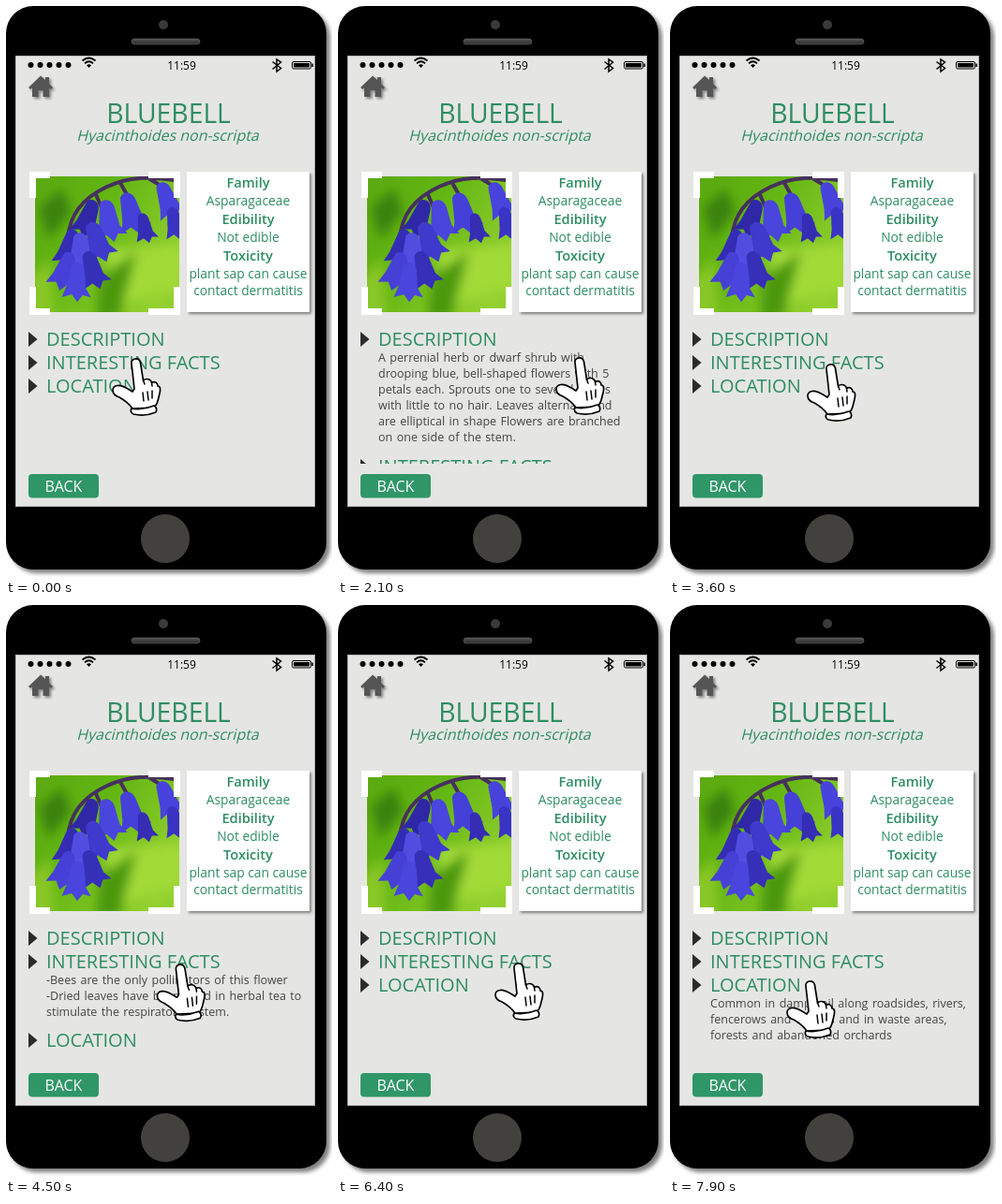
Write an HTML page that moves like this. It is 348 px wide and 610 px high and loops after 8 s.

```html
<!DOCTYPE html>
<html lang="en">
<head>
<meta charset="utf-8">
<title>Bluebell</title>
<style>
  html, body { margin: 0; width: 100%; height: 100%; overflow: hidden; background: #fff; }
  svg { display: block; width: 348px; height: 610px; font-family: "Open Sans", "Noto Sans", sans-serif; }
  .green { fill: #2d8d61; }
  .mid { text-anchor: middle; }
  .head { font-size: 20px; }
  .body { font-size: 12.5px; word-spacing: 1.2px; fill: #444; }
  .label { font-size: 14.6px; font-weight: 600; }
  .value { font-size: 13.8px; }
</style>
</head>
<body>
<svg viewBox="0 0 348 610">
  <defs>
    <linearGradient id="leaf" x2="1" y2=".6">
      <stop offset="0" stop-color="#5aa811"/>
      <stop offset=".45" stop-color="#62b512"/>
      <stop offset="1" stop-color="#93d02f"/>
    </linearGradient>
    <linearGradient id="metal" x2="0" y2="1">
      <stop offset="0" stop-color="#555"/>
      <stop offset="1" stop-color="#2b2b2b"/>
    </linearGradient>
    <filter id="shadow" x="-10%" y="-10%" width="125%" height="125%">
      <feDropShadow dx="2" dy="2" stdDeviation="1.8" flood-opacity=".45"/>
    </filter>
    <filter id="deep" x="-10%" y="-10%" width="125%" height="125%">
      <feDropShadow dx="4" dy="4" stdDeviation="2.2" flood-opacity=".5"/>
    </filter>
    <filter id="soft"><feGaussianBlur stdDeviation="6"/></filter>
    <clipPath id="photo"><rect x="31" y="182" width="154" height="145"/></clipPath>
    <clipPath id="list"><rect x="10" y="338" width="320" height="151"/></clipPath>
    <path id="bell" d="M-4-13C0-18 6-15 7-9L9 5 14 12 7 11 3 17-2 11-10 14-7 5Z"/>
  </defs>

  <!-- phone -->
  <rect width="342" height="602" rx="29" filter="url(#deep)"/>
  <circle cx="168" cy="20" r="5" fill="#3a3a3a"/>
  <rect x="134" y="35" width="73" height="6" rx="3" fill="url(#metal)" stroke="#666" stroke-width=".6"/>
  <circle cx="170" cy="569" r="26" fill="#43413e"/>
  <rect x="10.500" y="53.500" width="319" height="481" fill="#e5e6e3" stroke="#bbb"/>

  <!-- status bar -->
  <path d="M26.500 63H68" stroke="#000" stroke-width="6" stroke-linecap="round" stroke-dasharray="0 10"/>
  <g fill="none" stroke="#000" stroke-width="1.800">
    <path d="M81.500 58.500Q88.500 52.500 95.500 58.500M84 61.300Q88.500 57.300 93 61.300"/>
    <path d="M284.500 59.500L293.500 66.500 289 70V57L293.500 60 284.500 67.500" stroke-width="1.500"/>
    <rect x="305.500" y="59.500" width="20" height="7.500" rx="1.500" stroke-width="1"/>
  </g>
  <path d="M86 63.300Q88.500 61.300 91 63.300L88.500 66ZM307 61H324V65.500H307ZM326.500 61.500H328V65H326.500Z"/>
  <text class="mid" x="187.500" y="67.500" font-size="12" font-weight="500">11:59</text>
  <path d="M24 87L37 74.500 42 79V76H46V83L50 87 48 89 46 87.500V97H39.500V90H34.500V97H28V87.500L26 89Z"
        fill="#555" filter="url(#shadow)"/>

  <!-- title -->
  <g class="green mid">
    <text x="173.500" y="125" font-size="28.300">BLUEBELL</text>
    <text transform="translate(172.500 143.500) skewX(-14)" font-size="16">Hyacinthoides non-scripta</text>
  </g>

  <!-- photo -->
  <g clip-path="url(#photo)">
    <rect x="25" y="176" width="162" height="156" fill="url(#leaf)"/>
    <g filter="url(#soft)">
      <path d="M35 215L60 195 70 220 45 250Z" fill="#3a8210"/>
      <path d="M105 260L190 255V300L115 320Z" fill="#a2da38"/>
      <path d="M25 290L48 270 52 335H25Z" fill="#89c728"/>
      <path d="M100 290L140 262 120 335H95Z" fill="#4c980f"/>
    </g>
    <path d="M66 248C68 222 84 204 108 193S152 182 186 187M95 199L104 220M122 189L131 205M152 184L172 196"
          fill="none" stroke="#46305c" stroke-width="4"/>
    <g id="bells"></g>
  </g>
  <path d="M28.500 205V180.500H47M152 180.500H182.500V205M182.500 300V326.500H152M47 326.500H28.500V300"
        fill="none" stroke="#fff" stroke-width="7"/>

  <!-- fact card -->
  <rect x="193" y="177" width="131" height="150" fill="#fff" filter="url(#shadow)"/>
  <g id="card" class="green mid"></g>

  <g id="sections" clip-path="url(#list)"></g>

  <rect x="24" y="500" width="75" height="25.500" rx="4" fill="#2f9668"/>
  <text class="mid" x="61.500" y="518.500" font-size="16" fill="#fff">BACK</text>

  <g id="hand" fill="#fff" stroke="#000" stroke-width="1.700" stroke-linejoin="round" stroke-linecap="round">
    <path d="M-5 5C-6-1 3-2 4.500 4L7.500 23C11 20 16 22 16.500 25.500 20 23 23 26 23 29 26 29 26 33 25 37L23 45Q22 49 19 52L-4 53Q-9 46-18 41C-27 38-27 29-20 28.500-14 28-9 32-4 35L-2 32Z"/>
    <path d="M-5 53Q7 55 19 50 23 52 21 57 9 62-3 59-7 57-5 53Z"/>
    <path d="M7.500 23L9 27M16.500 25.500L17 29M7 36L8 45M12 35L13 44M17 34L17 42" fill="none" stroke-width="1.500"/>
  </g>
</svg>
<script>
const $ = id => document.getElementById(id);
const LOOP = 8000;
const label = (x, y, cls, text) => `<text x="${x}" y="${y}" class="${cls}">${text}</text>`;

// x, y, size, rotation, colour
$('bells').innerHTML = [
  [86, 226, 1.3, 20, '#3027a6'], [108, 229, 1.4, -8, '#4a45dc'], [132, 221, 1.4, -15, '#4540d8'],
  [147, 237, 1, -10, '#362db5'], [171, 208, 1.3, -20, '#4843dc'], [179, 232, 1.1, -12, '#3b33c4'],
  [66, 258, 1.3, 15, '#352cb5'], [96, 252, 1.4, -18, '#3f39cc'], [78, 264, 1.4, 0, '#524de0'],
  [61, 282, 1.3, 20, '#4640d6'], [91, 282, 1.3, -15, '#362fb8'], [74, 294, 1.3, 5, '#4a45dc']
].map(([x, y, size, turn, color]) =>
  `<use href="#bell" fill="${color}" transform="translate(${x} ${y}) rotate(${turn}) scale(${size})"/>`).join('');

$('card').innerHTML = [
  ['label', 194, 'Family'], ['value', 213, 'Asparagaceae'],
  ['label', 233, 'Edibility'], ['value', 252, 'Not edible'],
  ['label', 272, 'Toxicity'], ['value', 291, 'plant sap can cause'], ['value', 309, 'contact dermatitis']
].map(([cls, y, text]) => label(258.5, y, cls, text)).join('');

const sections = [
  { title: 'DESCRIPTION', from: 1000, to: 3200, room: 111, lines: [
    'A perrenial herb or dwarf shrub with', 'drooping blue, bell-shaped flowers with 5',
    'petals each. Sprouts one to several stems', 'with little to no hair. Leaves alternate and',
    'are elliptical in shape Flowers are branched', 'on one side of the stem.'] },
  { title: 'INTERESTING FACTS', from: 4000, to: 6400, room: 59, lines: [
    '-Bees are the only pollinators of this flower', '-Dried leaves have been used in herbal tea to',
    'stimulate the respiratory system.'] },
  { title: 'LOCATION', from: 7100, to: LOOP, room: 59, lines: [
    'Common in damp soil along roadsides, rivers,', 'fencerows and ditches and in waste areas,',
    'forests and abandoned orchards'] }
];
$('sections').innerHTML = sections.map(s => `<g>
  <path d="M24-15L33.500-7 24 1Z" fill="#2b2b2b"/>${label(43, 0, 'green head', s.title)}
  <g>${s.lines.map((line, i) => label(43, 17 + 17 * i, 'body', line)).join('')}</g></g>`).join('');
const groups = [...$('sections').children];

// time, x, y of the fingertip
const path = [
  [0, 139, 377], [100, 139, 377], [200, 140, 373], [400, 140, 373], [800, 145, 355], [1000, 145, 355],
  [1800, 262, 374], [2100, 258, 376], [2700, 256, 390], [3000, 152, 356], [3200, 152, 356],
  [3600, 172, 383], [3800, 176, 381], [4000, 176, 381], [4700, 189, 385], [5200, 190, 385],
  [5800, 193, 383], [6400, 193, 383], [7000, 151, 401], [7900, 150, 402], [LOOP, 150, 402]
];

function draw(now) {
  const t = now % LOOP;
  let y = 363;
  sections.forEach((s, i) => {
    const open = t >= s.from && t < s.to;
    groups[i].setAttribute('transform', `translate(0 ${y})`);
    groups[i].lastElementChild.style.display = open ? '' : 'none';
    y += 25 + (open ? s.room : 0);
  });
  const next = path.findIndex(p => p[0] > t);
  const [t0, x0, y0] = path[next - 1], [t1, x1, y1] = path[next];
  const k = (t - t0) / (t1 - t0), ease = k * k * (3 - 2 * k);
  $('hand').setAttribute('transform', `translate(${x0 + (x1 - x0) * ease} ${y0 + (y1 - y0) * ease})`);
  requestAnimationFrame(draw);
}
requestAnimationFrame(draw);
</script>
</body>
</html>
```
